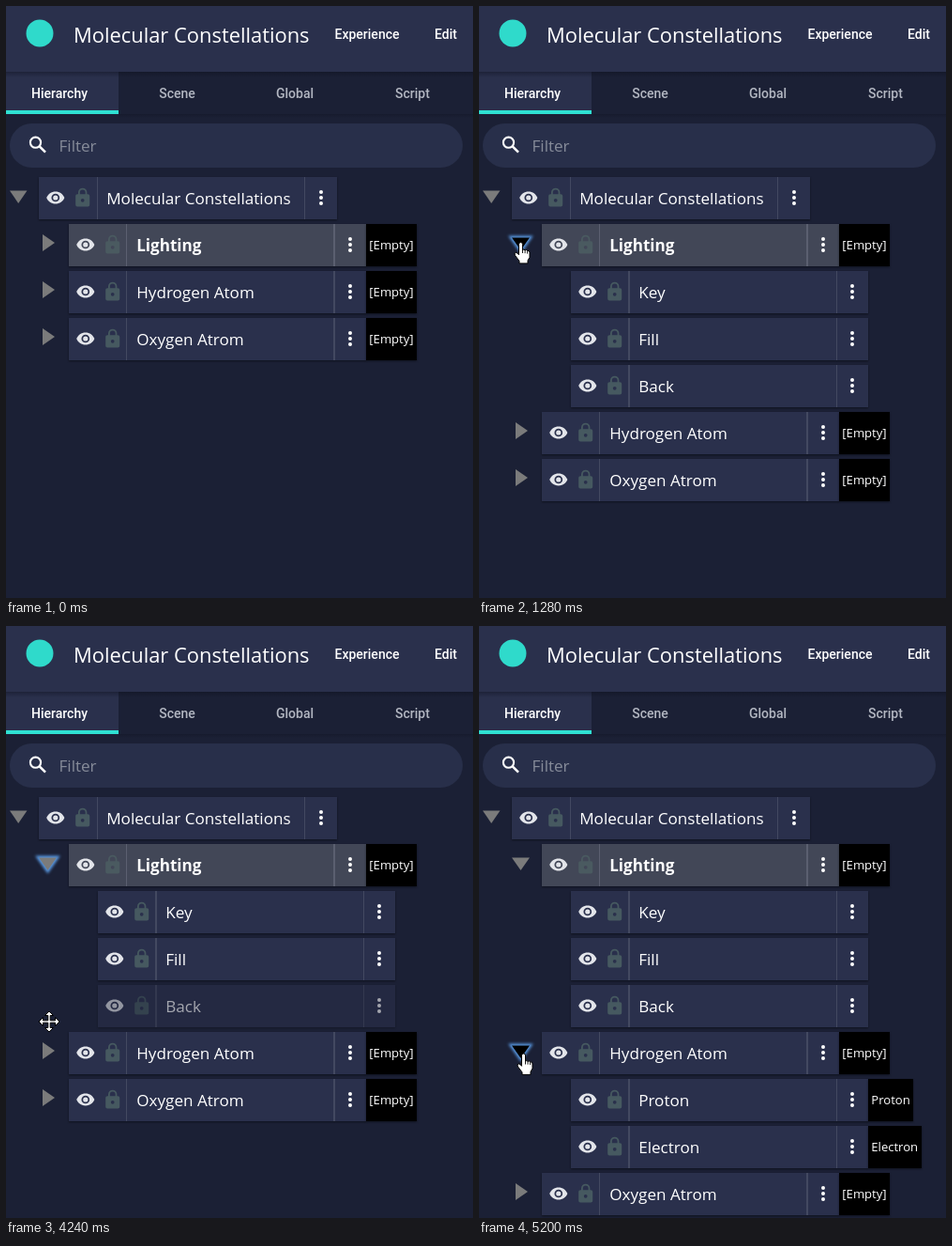
Write an HTML page that moves like this. It is 498 px wide and 630 px high and loops after 7880 ms.

```html
<!DOCTYPE html>
<html lang="en">
<head>
<meta charset="utf-8">
<title>Hierarchy panel</title>
<style>
  html, body { margin: 0; width: 100%; height: 100%; overflow: hidden; background: #1b2035; }
  svg { display: block; width: 498px; height: 630px; }
  text { font-family: "Open Sans", "Noto Sans", sans-serif; font-weight: 500; fill: #fff; }
  .menu, .tab { font: 500 14px Roboto, Arial, sans-serif; }
  .tab { fill: #b3b7c2; text-anchor: middle; }
  .label { font-size: 17.1px; }
  .tag { font-size: 13.1px; }
  .card { filter: drop-shadow(0 1.5px 1px rgba(0, 0, 0, .45)); }
  .glow { fill: #5a9be6; stroke: #5a9be6; stroke-width: 4; filter: blur(1.6px); }
</style>
</head>
<body>
<svg id="stage" viewBox="0 0 498 630">
  <defs>
    <linearGradient id="shade" x2="0" y2="1">
      <stop stop-color="#0c0f1c" stop-opacity=".42"/>
      <stop offset="1" stop-color="#0c0f1c" stop-opacity="0"/>
    </linearGradient>
    <path id="eye" d="M12 4.5C7 4.5 2.73 7.61 1 12c1.73 4.39 6 7.5 11 7.5s9.27-3.11 11-7.5c-1.73-4.39-6-7.5-11-7.5zM12 17a5 5 0 1 1 0-10 5 5 0 0 1 0 10zm0-8a3 3 0 1 0 0 6 3 3 0 0 0 0-6z"/>
    <path id="lock" d="M18 8h-1V6A5 5 0 0 0 7 6v2H6a2 2 0 0 0-2 2v10a2 2 0 0 0 2 2h12a2 2 0 0 0 2-2V10a2 2 0 0 0-2-2zm-6 9a2 2 0 1 1 0-4 2 2 0 0 1 0 4zm3.1-9H8.9V6a3.1 3.1 0 0 1 6.2 0z"/>
    <path id="dots" d="M12 4a2 2 0 1 0 0 4 2 2 0 0 0 0-4zm0 6a2 2 0 1 0 0 4 2 2 0 0 0 0-4zm0 6a2 2 0 1 0 0 4 2 2 0 0 0 0-4z"/>
  </defs>
  <rect width="498" height="630" fill="#1b2035"/>
  <rect width="498" height="70" fill="#2a304c"/>
  <circle cx="36" cy="29" r="14.5" fill="#2fdacb"/>
  <text x="72" y="39" font-size="21.9" style="font-weight:400">Molecular Constellations</text>
  <text class="menu" x="350.5" y="35">Experience</text>
  <text class="menu" x="457" y="35">Edit</text>

  <rect y="70" width="120" height="45" fill="#2a304c"/>
  <rect y="70" width="498" height="6" fill="url(#shade)"/>
  <rect x="120" y="115" width="378" height="4" fill="url(#shade)" opacity=".7"/>
  <rect y="111" width="120" height="4" fill="#2fe0d2"/>
  <text class="tab" x="57" y="98" style="fill:#fff">Hierarchy</text>
  <text class="tab" x="182.5" y="98">Scene</text>
  <text class="tab" x="308" y="98">Global</text>
  <text class="tab" x="433.5" y="98">Script</text>

  <rect x="4" y="125" width="483" height="47" rx="23.5" fill="#282f4a"/>
  <g fill="none" stroke="#fff" stroke-width="2.1">
    <circle cx="31.5" cy="145.2" r="5.6"/>
    <path d="M35.7 149.4l6.3 6.3" stroke-width="2.5"/>
  </g>
  <text class="label" x="56.5" y="154.5" style="fill:#868b99">Filter</text>

  <g id="rows"></g>
  <g id="cursor" stroke="#000" fill="#fff">
    <path id="move" stroke-width="1" d="M0-11l4.5 4.5H1.2V-1.2H6.5V-4.5L11 0 6.5 4.5V1.2H1.2V6.5H4.5L0 11-4.5 6.5h3.3V1.2H-6.5V4.5L-11 0-6.5-4.5v3.3h5.3V-6.5h-3.3z"/>
    <g id="hand">
      <path d="M-2 1.5a2 2 0 0 1 4 0v6q1.5-1 2.6.4 1.4-.9 2.5.5 2.4-.5 2.4 2v5l-2 3.5v3h-9v-2.5l-4.5-6q-1.5-2.6 1-3 1.5.2 3 2.4z"/>
      <path d="M2 7v4M4.6 8v3.2M7.1 8.6v3" fill="none" stroke-width=".9"/>
    </g>
  </g>
</svg>
<script>
const LOOP = 7880, STEP = 80;
const FOCUS_LIGHT = 1040, OPEN_LIGHT = 1280, FOCUS_HYDRO = 4960, OPEN_HYDRO = 5200;
const $ = id => document.getElementById(id);
const clamp = v => Math.max(0, Math.min(1, v));

// Cursor hot spot: time, x, y
const PATH = [
  [80, 13, 255], [320, 37, 254], [400, 41, 254], [480, 41, 254],
  [560, 43, 253], [720, 43, 253], [800, 44.5, 252], [3440, 44.5, 252],
  [3520, 45, 263], [4000, 46.5, 377.5], [4240, 46, 421], [4320, 46, 427],
  [4480, 46.5, 444], [4640, 47.5, 455.5]
];

const RIGHT = "M39 11L52 20 39 29z";
const DOWN = "M35 14.5h19L44.5 28z";

const ROWS = {
  root: { level: 0, label: "Molecular Constellations" },
  light: { level: 1, label: "Lighting", tag: "[Empty]", tagWidth: 54, selected: true },
  key: { level: 2, label: "Key" },
  fill: { level: 2, label: "Fill" },
  back: { level: 2, label: "Back" },
  hydro: { level: 1, label: "Hydrogen Atom", tag: "[Empty]", tagWidth: 54 },
  proton: { level: 2, label: "Proton", tag: "Proton", tagWidth: 48 },
  electron: { level: 2, label: "Electron", tag: "Electron", tagWidth: 57 },
  oxygen: { level: 1, label: "Oxygen Atrom", tag: "[Empty]", tagWidth: 54 }
};

function icon(id, cx, scale, fill) {
  return `<use href="#${id}" fill="${fill}" transform="translate(${cx} 22) scale(${scale}) translate(-12 -12)"/>`;
}

function rowMarkup({ level, label, tag, tagWidth, selected }) {
  const x = [35, 67, 98][level];
  const line = selected ? "#5b5f70" : "#434961";
  const arrow = level === 0
    ? `<path d="M4 14.5h18.5L13.2 28z" fill="#7b7b7b"/>`
    : level === 1 ? `<path class="glow" d="${RIGHT}"/><path class="arrow" d="${RIGHT}"/>` : "";
  return `${arrow}<g class="body"><g transform="translate(${x} 0)">
    <rect class="card" width="${level ? 317 : 318}" height="45" fill="${selected ? "#424757" : "#2a304c"}"/>
    <rect x="${level ? 61 : 62}" width="${level === 2 ? 2 : 1}" height="45" fill="${line}"/>
    <rect x="${level === 1 ? 282 : 283}" width="${level === 1 ? 2 : 1}" height="45" fill="${line}"/>
    ${icon("eye", 17.8, .87, "#e3e5ea")}${icon("lock", 46.7, .94, selected ? "#4a5a60" : "#465960")}
    ${icon("dots", level ? 300 : 301, 1, "#fff")}
    <text class="label" x="72.2" y="29" ${selected ? 'style="font-weight:700"' : ""}>${label}</text>
    ${tag ? `<rect class="card" x="317" width="${tagWidth}" height="45" fill="#000"/>
    <text class="tag" x="320.3" y="27">${tag}</text>` : ""}
  </g></g>`;
}

for (const row of Object.values(ROWS)) {
  row.node = document.createElementNS("http://www.w3.org/2000/svg", "g");
  row.node.innerHTML = rowMarkup(row);
  row.body = row.node.querySelector(".body");
  row.arrow = row.node.querySelector(".arrow");
  row.glow = row.node.querySelector(".glow");
  $("rows").append(row.node);
}

function cursorAt(t) {
  const i = PATH.findIndex(p => p[0] > t);
  if (i < 0) return PATH[PATH.length - 1].slice(1);
  if (i === 0) return PATH[0].slice(1);
  const [a, b] = [PATH[i - 1], PATH[i]];
  const k = (t - a[0]) / (b[0] - a[0]);
  return [a[1] + (b[1] - a[1]) * k, a[2] + (b[2] - a[2]) * k];
}

function styleArrow(row, open, hover, glow) {
  for (const part of [row.arrow, row.glow]) part.setAttribute("d", open ? DOWN : RIGHT);
  row.arrow.setAttribute("fill", hover ? "#000" : "#7b7b7b");
  row.glow.setAttribute("opacity", glow);
}

function layout(lightOpen, hydroOpen) {
  const hidden = {
    key: !lightOpen, fill: !lightOpen, back: !lightOpen,
    proton: !hydroOpen, electron: !hydroOpen
  };
  let y = 182;
  for (const [name, row] of Object.entries(ROWS)) {
    row.node.style.display = hidden[name] ? "none" : "";
    row.node.setAttribute("transform", `translate(0 ${y})`);
    row.y = y;
    if (!hidden[name]) y += 50;
  }
}

function render(time) {
  const t = Math.floor(time / STEP) * STEP;
  const lightOpen = t >= OPEN_LIGHT, hydroOpen = t >= OPEN_HYDRO;
  layout(lightOpen, hydroOpen);

  const [x, y] = cursorAt(t);
  const onLight = t >= 400 && t <= 3520;
  const onHydro = t >= 4480;
  const pointing = onLight || onHydro;

  const lightGlow = clamp((t - FOCUS_LIGHT + STEP) / 240) * (1 - clamp((t - FOCUS_HYDRO + STEP) / 320));
  styleArrow(ROWS.light, lightOpen, onLight, lightGlow);
  styleArrow(ROWS.hydro, hydroOpen, onHydro, clamp((t - FOCUS_HYDRO + STEP) / 240));
  styleArrow(ROWS.oxygen, false, false, 0);

  // The row beside a move cursor is dimmed.
  for (const name of ["light", "key", "fill", "back"]) {
    const row = ROWS[name];
    const dimmed = t >= STEP && !pointing && y >= row.y - 2 && y < row.y + 48;
    row.body.setAttribute("opacity", dimmed ? .6 : 1);
  }

  $("cursor").style.display = t < STEP ? "none" : "";
  $("cursor").setAttribute("transform", `translate(${x} ${y})`);
  $("hand").style.display = pointing ? "" : "none";
  $("move").style.display = pointing ? "none" : "";
}

const start = performance.now();
function tick() {
  render((performance.now() - start) % LOOP);
  requestAnimationFrame(tick);
}
tick();
</script>
</body>
</html>
```
